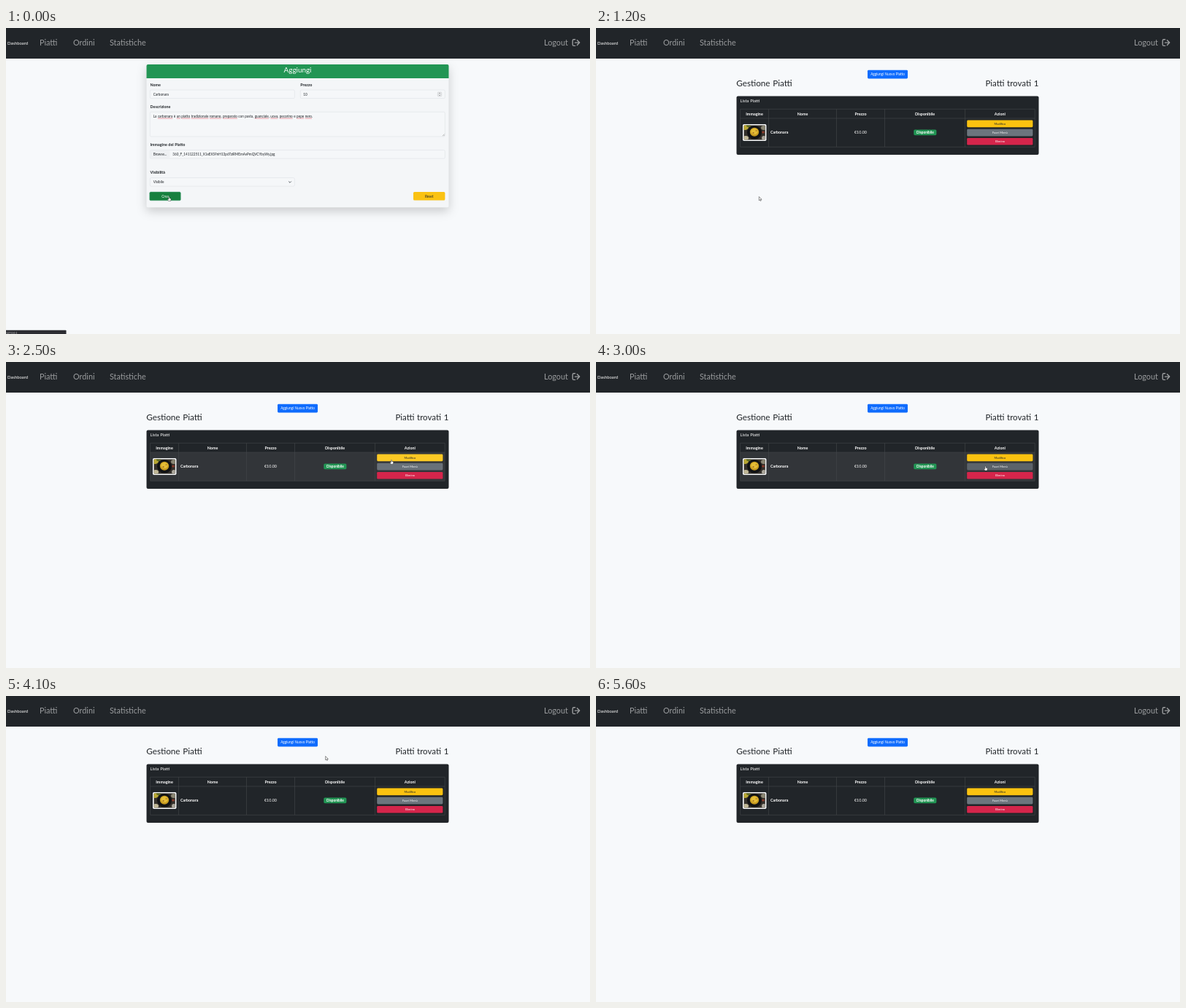
An HTML page for the animation above (5700 ms loop, 800x420 px).

```html
<!DOCTYPE html>
<html lang="it">
<head>
<meta charset="utf-8">
<title>Gestione Piatti</title>
<style>
  html, body { margin: 0; width: 100%; height: 100%; overflow: hidden; background: #f7f9fb; }
  svg { display: block; width: 800px; height: 420px; }
  text { font-family: Lato, "Open Sans", sans-serif; word-spacing: .06em; white-space: pre; }
  #form-card { filter: drop-shadow(0 5px 7px rgba(0, 0, 0, .19)); }
</style>
</head>
<body>
<svg id="stage" viewBox="0 0 800 420" xmlns="http://www.w3.org/2000/svg"></svg>
<script>
const LOOP = 5700, STEP = 100, LIST_AT = 200;
const DARK = '#212529', MUTED = '#9b9d9f', GREEN = '#229554', FIELD = '#dde1e6';

const rect = (x, y, w, h, fill, r = 0, extra = '') =>
  `<rect x="${x}" y="${y}" width="${w}" height="${h}" rx="${r}" fill="${fill}" ${extra}/>`;
const text = (x, y, size, str, fill = DARK, extra = '') =>
  `<text x="${x}" y="${y}" font-size="${size}" fill="${fill}" ${extra}>${str}</text>`;
const mid = 'text-anchor="middle"', bold = 'font-weight="700"';
const path = (d, stroke, width, extra = '') =>
  `<path d="${d}" fill="none" stroke="${stroke}" stroke-width="${width}" ${extra}/>`;
const group = (id, ...parts) => `<g id="${id}">${parts.join('')}</g>`;

const field = (x, y, w, h) => rect(x, y, w, h, '#f5f7f9', 1.5, `stroke="${FIELD}" stroke-width=".6"`);
const label = (x, y, str) => text(x, y, 5.35, str, DARK, bold);
const value = (x, y, str) => text(x, y, 4.68, str);

function navbar() {
  const links = [[46, 'Piatti'], [92, 'Ordini'], [142, 'Statistiche'], [737, 'Logout']];
  return rect(0, 0, 800, 42, DARK) + text(2, 22.7, 5.9, 'Dashboard', '#fff') +
    links.map(([x, s]) => text(x, 24.2, 10.8, s, MUTED)).join('') +
    path('M779.6 15.8h-1.8q-1.6 0-1.6 1.6v5.4q0 1.6 1.6 1.6h1.8M779.4 20.1h6M782.4 16.7l3.3 3.4l-3.3 3.4',
      MUTED, 1.4, 'stroke-linecap="round" stroke-linejoin="round"');
}

// Words marked with * carry the spell-check underline.
function checked(x, y, str) {
  const words = str.split(' ').map(w => {
    if (w[0] !== '*') return w;
    const [, word, tail] = w.match(/^\*([^,.]+)(.*)$/);
    return `<tspan fill="#dc3545" text-decoration="underline"><tspan fill="${DARK}">${word}</tspan></tspan>${tail}`;
  });
  return text(x, y, 4.68, words.join(' '));
}

function formPage() {
  return group('form-card', rect(192.5, 50, 414, 196.3, '#f4f6f8', 2)) +
    `<path d="M192.5 69V52q0-2 2-2h410q2 0 2 2v17z" fill="${GREEN}"/>` +
    text(399.5, 61.4, 9.9, 'Aggiungi', '#fff', mid) +
    label(197.5, 79.8, 'Nome') + field(197.3, 85, 198, 11.6) + value(201.7, 92.5, 'Carbonara') +
    label(403.3, 79.8, 'Prezzo') + field(403.3, 85, 198, 11.6) + value(407.3, 92.5, '10') +
    rect(591.3, 88, 5.4, 5.8, '#eceef0', 1, 'stroke="#b5b8bc" stroke-width=".4"') +
    path('M592.8 90.2l1.2-1.1l1.2 1.1M592.8 91.7l1.2 1.1l1.2-1.1', '#555', .5) +
    label(197.5, 109.8, 'Descrizione') + field(197.3, 115.2, 404, 33.8) +
    checked(201.7, 122.8, 'La *carbonara è *un *piatto *tradizionale *romano, *preparato con pasta, ' +
      '*guanciale, *uova, *pecorino e *pepe *nero.') +
    path('M598 148.2l2.7-2.7M599.6 148.2l1.1-1.1', '#777', .5) +
    label(197.5, 162.4, 'Immagine del Piatto') + field(197.3, 167.6, 404, 11.6) +
    rect(197.6, 167.9, 26.8, 11, '#eef0f3', 1.2) + value(201.7, 175.1, 'Browse...') +
    value(228.3, 175.1, '360_F_141122511_X1eEXS9nH13p6TziRMEmAvPmQVCYbyWy.jpg') +
    label(197.5, 200.2, 'Visibilità') + field(197.3, 205.6, 198, 11.6) + value(201.7, 213, 'Visibile') +
    path('M387.2 210.5l1.8 1.8l1.8-1.8', '#343a40', .8) +
    rect(196.7, 225, 42.6, 11.8, '#17803f', 1.6, 'stroke="#57a985" stroke-width=".5"') +
    text(218, 232.6, 4.7, 'Crea', '#fff', mid) +
    rect(558, 225, 43.4, 11.6, '#fac213', 1.6) + text(579.7, 232.5, 4.7, 'Reset', DARK, mid);
}

function photo() {
  const blob = (cx, cy, rx, ry, fill) => `<ellipse cx="${cx}" cy="${cy}" rx="${rx}" ry="${ry}" fill="${fill}"/>`;
  return rect(201, 132, 32.4, 23, '#f8f9fb', 1.8) +
    '<clipPath id="frame"><rect x="202.6" y="133.6" width="29.2" height="19.8" rx="1"/></clipPath>' +
    '<g clip-path="url(#frame)">' + rect(202, 133, 31, 21, '#34302a') +
    blob(204, 136, 5, 4, '#b9a832') + blob(205, 151, 4, 3, '#c0b796') + blob(209, 134, 3, 2, '#5e6a25') +
    blob(230, 137, 4, 3, '#8b8774') + blob(229, 143, 2, 1.5, '#8a3a2a') + blob(230, 151, 3, 3, '#aaa59a') +
    blob(217, 143.3, 10, 9.3, '#111214') + blob(217, 142.8, 6.2, 6, '#c79b20') +
    blob(217, 142, 4.6, 4.1, '#e5bd35') + blob(215.5, 144, 1.2, .8, '#8d5522') +
    blob(219.5, 141, 1, .8, '#a56b24') + '</g>';
}

const buttons = {
  add:    { x: 372,   y: 57.8,  w: 55,   h: 11.6, base: [15, 108, 253],  over: [11, 94, 215],  ink: '#fff', size: 4.7, str: 'Aggiungi Nuovo Piatto' },
  edit:   { x: 508.2, y: 126.5, w: 90.2, h: 9.7,  base: [250, 194, 16],  over: [253, 205, 50], ink: DARK, size: 4.05, str: 'Modifica' },
  hide:   { x: 508.2, y: 138.7, w: 90.2, h: 9.7,  base: [108, 117, 125], over: [92, 99, 106],  ink: '#fff', size: 4.05, str: 'Fuori Menù' },
  remove: { x: 508.2, y: 150.9, w: 90.2, h: 9.7,  base: [213, 37, 75],   over: [178, 32, 58],  ink: '#fff', size: 4.05, str: 'Elimina' }
};
const button = ([id, b]) => rect(b.x, b.y, b.w, b.h, `rgb(${b.base})`, 1.4, `id="${id}"`) +
  text(b.x + b.w / 2, b.y + b.h / 2 + b.size * .34, b.size, b.str, b.ink, mid);

function listPage() {
  const cols = [197.6, 236.5, 329.5, 395.5, 505.6, 601.2];
  const heads = ['Immagine', 'Nome', 'Prezzo', 'Disponibile', 'Azioni'];
  const lines = cols.map(x => `M${x} 111.3V163.3`).join('') +
    [111.3, 124, 163.3].map(y => `M197.6 ${y}H601.2`).join('');
  return text(192.3, 80, 11.7, 'Gestione Piatti') + text(606.3, 80, 11.5, 'Piatti trovati 1', DARK, 'text-anchor="end"') +
    rect(192.5, 93.6, 414, 80.4, DARK, 2) + text(197.6, 101.8, 5.75, 'Lista Piatti', '#fff') +
    rect(197.6, 124, 403.6, 39.3, '#323539', 0, 'id="row"') + path(lines, '#43474b', .6) +
    heads.map((s, i) => text((cols[i] + cols[i + 1]) / 2, 119.6, 5.4, s, '#fff', mid + bold.padStart(18))).join('') +
    photo() + text(239, 145.2, 5.25, 'Carbonara', '#fff', bold) +
    text(362.5, 145.3, 5.45, '€10.00', '#fff', mid) +
    rect(435.3, 139.5, 31.1, 7.7, GREEN, 1.6) + text(450.8, 145, 4.75, 'Disponibile', '#fff', mid + ' ' + bold) +
    Object.entries(buttons).map(button).join('');
}

const status = (id, w, str) =>
  group(id, rect(-1, 414.8, w + 1, 6, '#2b2c31', .8), text(0, 420, 3.7, str, '#d5d6d8'));

const $ = id => document.getElementById(id);
$('stage').innerHTML = rect(0, 0, 800, 420, '#f7f9fb') + navbar() +
  group('form', formPage()) + group('list', listPage()) +
  status('waiting', 82.5, '127.0.0.1') +
  status('link', 71.8, 'http://127.0.0.1:8000/admin/dishes/create') +
  group('cursor',
    '<path id="arrow" d="M0 0V5.2L1.2 4.2L2 5.9L2.9 5.5L2.1 3.8H3.7Z" fill="#fff" stroke="#222" stroke-width=".5"/>',
    '<path id="hand" d="M-.6 .4Q0-.4.6.4V2.2L2 2.5Q2.8 2.7 2.7 3.6L2.2 6H-.7L-2 3.9Q-1.8 3-.6 3.7Z" fill="#fff" stroke="#222" stroke-width=".4"/>');

// time, x, y of the pointer tip
const track = [
  [0, 223.3, 231.5], [1500, 223.3, 231.5], [1800, 336, 187], [2100, 430, 160], [2300, 510, 141],
  [2450, 528, 134.2], [2600, 528, 134.2], [2900, 532, 141], [3100, 535, 145], [3250, 537, 153],
  [3550, 537, 152], [3600, 536, 139], [3700, 535, 138.8], [3900, 495, 118], [4200, 409, 65],
  [4600, 407, 63], [4640, 406.6, 60], [4700, 406.5, 27.3], [4800, 404, 8], [4900, 403, -8], [LOOP, 403, -8]
];

function pointer(t) {
  if (t <= 0) return { x: track[0][1], y: track[0][2] };
  const i = track.findIndex(k => k[0] >= t), [t0, x0, y0] = track[i - 1], [t1, x1, y1] = track[i];
  const p = (t - t0) / (t1 - t0);
  return { x: x0 + (x1 - x0) * p, y: y0 + (y1 - y0) * p };
}

const inside = (p, b) => p.x >= b.x && p.x <= b.x + b.w && p.y >= b.y && p.y <= b.y + b.h;
const row = { x: 197.6, y: 124, w: 403.6, h: 39.3 };
const show = (id, on) => $(id).setAttribute('visibility', on ? 'visible' : 'hidden');

// Buttons fade between their colours over 150 ms.
function hoverLevel(t, b) {
  const past = [0, 37.5, 75, 112.5, 150];
  return past.filter(d => inside(pointer(t - d), b)).length / past.length;
}

function draw(t) {
  const p = pointer(t), onForm = t < LIST_AT;
  const hand = onForm || Object.values(buttons).some(b => inside(p, b));
  $('form').style.display = onForm ? '' : 'none';
  $('list').style.display = onForm ? 'none' : '';
  show('waiting', onForm);
  show('link', t >= 4300 && t < 4900);
  show('row', inside(p, row));
  show('hand', hand);
  show('arrow', !hand);
  $('cursor').setAttribute('transform', `translate(${p.x} ${p.y})`);
  for (const [id, b] of Object.entries(buttons)) {
    const k = hoverLevel(t, b);
    $(id).setAttribute('fill', `rgb(${b.base.map((c, i) => Math.round(c + (b.over[i] - c) * k))})`);
  }
}

const start = performance.now();
function tick() {
  const t = (performance.now() - start) % LOOP;
  draw(Math.floor(t / STEP) * STEP);
  requestAnimationFrame(tick);
}
tick();
</script>
</body>
</html>
```
